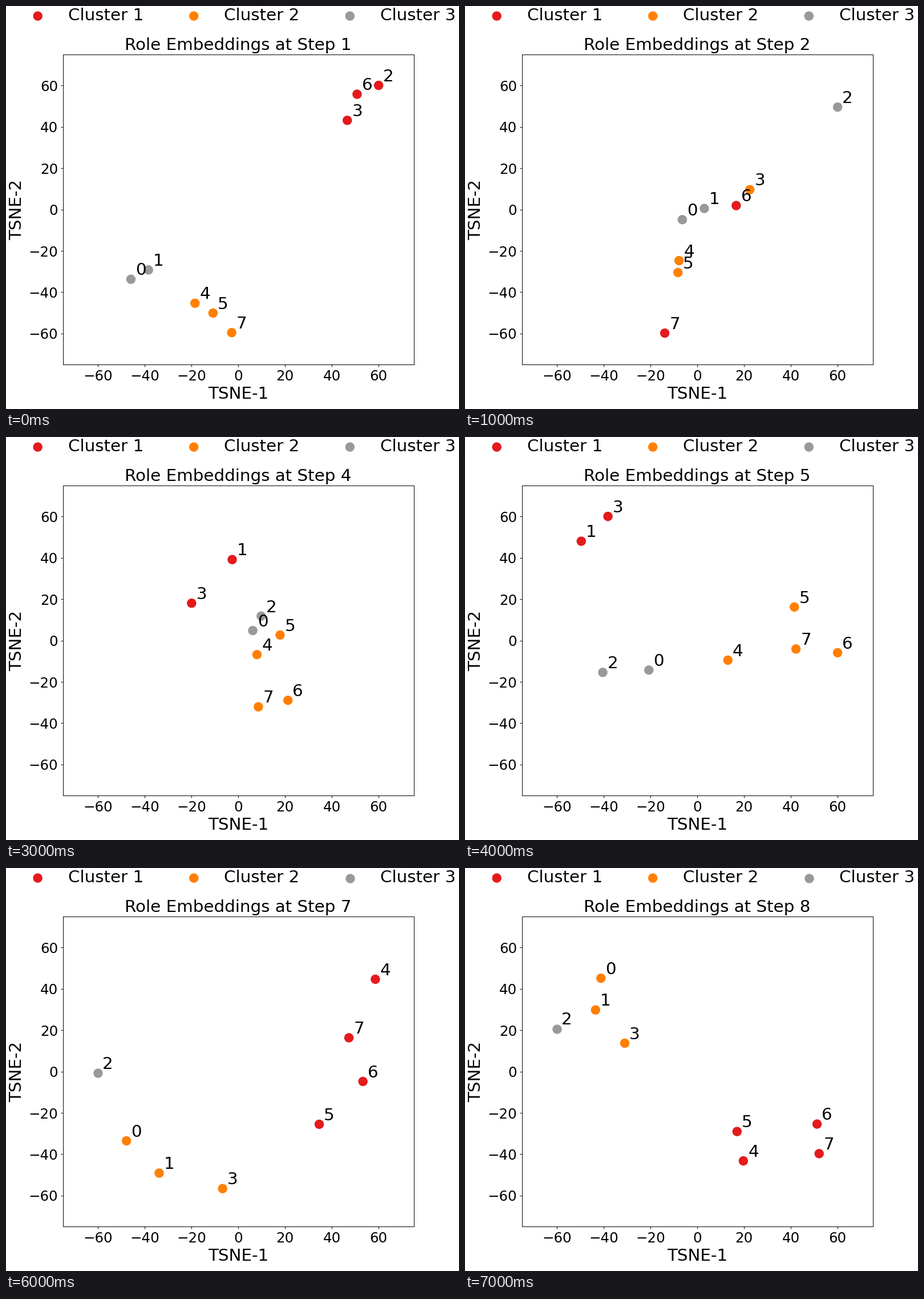
These frames come from a looping animation (794x706 px, 8000 ms). A matplotlib script:

```python
import matplotlib.pyplot as plt
import numpy as np
from matplotlib.animation import FuncAnimation

K = 0.8825  # scale of all point sizes
BIG, SMALL = 24 * K, 20 * K
COLORS = ["#e41a1c", "#ff7f00", "#999999"]
STEP_COUNT = 8

plt.rcParams.update({
    "font.family": "DejaVu Sans",
    "axes.linewidth": 0.8 * K,
    "axes.titlesize": BIG,
    "axes.titlepad": 6 * K,
    "axes.labelsize": BIG,
    "axes.labelpad": 4 * K,
    "legend.fontsize": BIG,
    "lines.linewidth": 1.5 * K,
})
for axis in ("xtick", "ytick"):
    plt.rcParams.update({
        f"{axis}.labelsize": SMALL,
        f"{axis}.major.size": 3.5 * K,
        f"{axis}.major.width": 0.8 * K,
        f"{axis}.major.pad": 3.5 * K,
    })

# Key steps: cluster, roles along a bowed chain, its start, end and bow
CHAINS = {
    1: [(1, "263", 60 + 60j, 46.6 + 43.1j, -0.217),
        (2, "457", -18.5 - 45.3j, -2.8 - 59.5j, 0.08),
        (3, "01", -45.9 - 33.7j, -38.4 - 29.2j)],
    3: [(1, "76", -25 - 60j, -17.5 - 51.9j),
        (2, "453", 2.9 - 4.1j, -1.7 - 23.9j, -0.347),
        (3, "012", 33.1 + 23.9j, 60 + 39j)],
    5: [(1, "13", -49.6 + 48j, -38.2 + 60j),
        (2, "45", 13.1 - 9.5j, 41.5 + 16.2j),
        (2, "76", 42.2 - 4.1j, 60 - 5.9j),
        (3, "20", -40.4 - 15.4j, -20.7 - 14.3j)],
    6: [(1, "310", -17.7 + 17.3j, 18.9 + 13.4j, 0.03),
        (2, "765", -19 - 55.9j, 4.2 - 48.7j, -0.325),
        (2, "4", 27.3 + 1j),
        (3, "2", 30 + 27.6j)],
    7: [(1, "56", 34.6 - 25.5j, 53.3 - 4.8j),
        (1, "74", 47.3 + 16.3j, 58.6 + 44.6j),
        (2, "013", -47.8 - 33.5j, -6.7 - 56.6j, -0.147),
        (3, "2", -60 - 0.8j)],
    8: [(1, "45", 19.7 - 43.2j, 17 - 29j),
        (1, "76", 52.1 - 39.7j, 51.2 - 25.4j),
        (2, "013", -41.2 + 45.1j, -31 + 13.7j, -0.215),
        (3, "2", -60 + 20.7j)],
}


def chain(roles, start, end=0, bow=0):
    """Place roles from start to end, with gaps that widen along the way."""
    t = np.linspace(0, 1, len(roles)) ** 1.25
    return start + (end - start) * (t + 4j * bow * t * (1 - t))


def layout(step):
    """Map each role to its cluster and position."""
    if step not in CHAINS:  # halfway between the neighbouring steps
        before, after = layout(step - 1), layout(step + 1)
        return {role: (cluster, (before[role][1] + z) / 2)
                for role, (cluster, z) in after.items()}
    return {role: (cluster, z)
            for cluster, roles, *shape in CHAINS[step]
            for role, z in zip(roles, chain(roles, *shape))}


fig, ax = plt.subplots(figsize=(7.94, 7.06), dpi=100)
fig.subplots_adjust(left=0.1255)


def draw(i):
    ax.clear()
    roles = layout(i + 1)
    for n, color in enumerate(COLORS, 1):
        z = np.array([z for cluster, z in roles.values() if cluster == n])
        ax.scatter(z.real, z.imag, s=150 * K**2, c=[color] * len(z),
                   label=f"Cluster {n}")
    for role, (_, z) in roles.items():
        ax.text(z.real + 2, z.imag + 2, role, fontsize=BIG)

    ticks = range(-60, 61, 20)
    ax.set(xlim=(-75, 75), ylim=(-75, 75), xticks=ticks, yticks=ticks,
           xlabel="TSNE-1", title=f"Role Embeddings at Step {i + 1}")
    ax.set_ylabel("TSNE-2", labelpad=5 * K)
    ax.legend(loc="upper center", bbox_to_anchor=(0.5, 1.1985), ncol=3,
              frameon=False)
    return []


anim = FuncAnimation(fig, draw, frames=STEP_COUNT, init_func=lambda: [],
                     interval=1000, repeat=True, repeat_delay=0)
plt.show()
```
